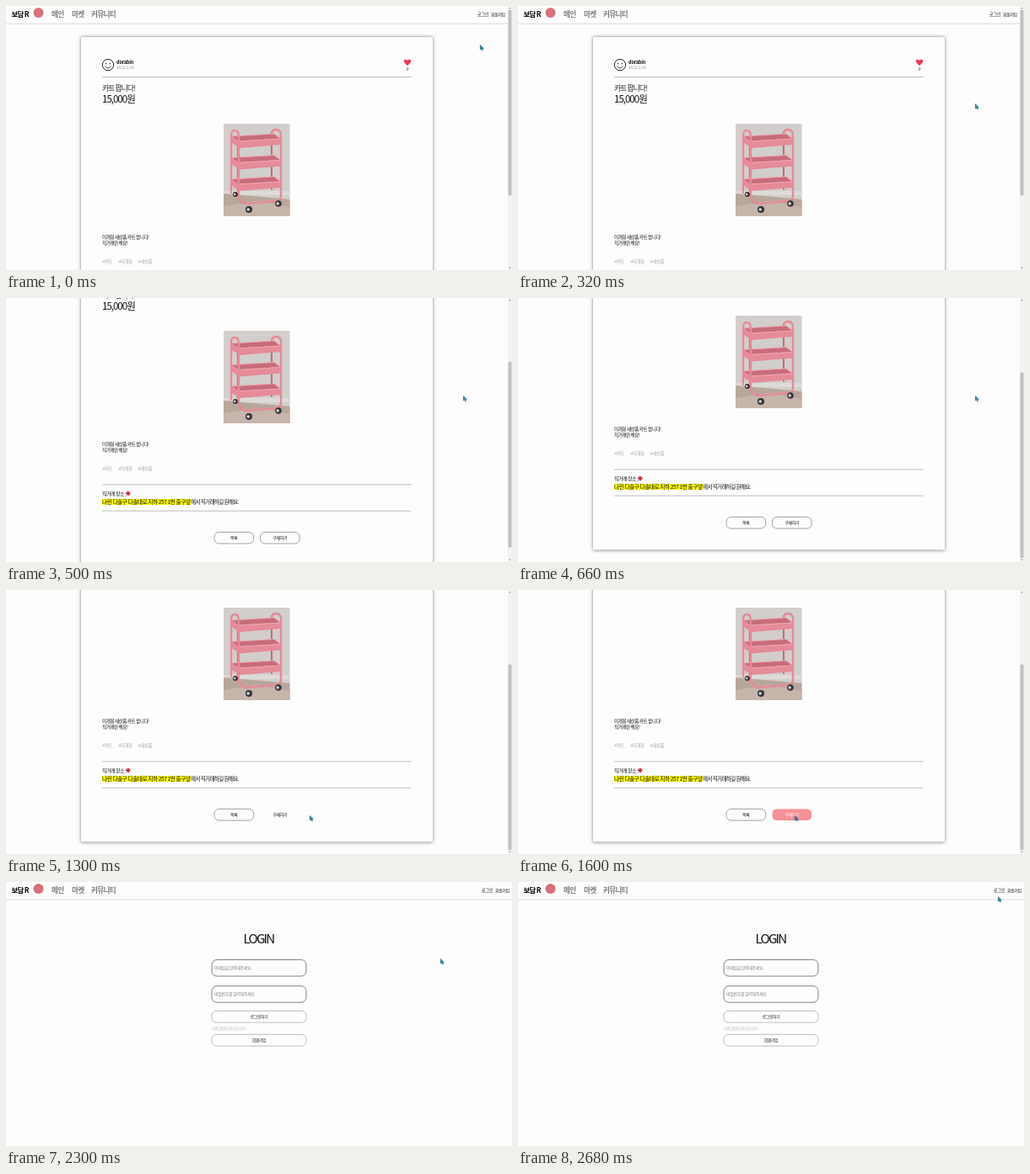
These frames come from a looping animation (600x314 px, 2700 ms). An HTML page with a canvas:

```html
<!DOCTYPE html>
<html lang="ko">
<head>
<meta charset="utf-8">
<style>
  html, body { margin: 0; width: 100%; height: 100%; overflow: hidden; background: #fefdfe; }
  canvas { display: block; }
</style>
</head>
<body>
<canvas id="stage" width="600" height="314"></canvas>
<script>
const ctx = document.getElementById('stage').getContext('2d');
const LOOP = 2700, MAX_SCROLL = 119;
const FONT = '"Noto Sans CJK KR", "Noto Sans CJK", "Noto Sans", sans-serif';
const HOVER_AT = 1300, ALERT_AT = 1620, LOGIN_AT = 2120;

// Pointer keys: time, x, y
const POINTER = [
  [0, 562, 46], [20, 562, 46], [280, 542, 116], [800, 542, 116],
  [1140, 408, 268], [1299, 408, 268], [1300, 360, 268], [1400, 328, 268],
  [1660, 328, 268], [1930, 307, 28], [1950, 307, 28], [2040, 352, 28],
  [2120, 352, 28], [2300, 515, 91], [2410, 515, 91], [2550, 581, 45],
  [2680, 569, 17], [2700, 569, 17]
];

const clamp = v => Math.max(0, Math.min(1, v));
const ease = v => v * v * (3 - 2 * v);
const progress = (t, from, to) => clamp((t - from) / (to - from));

// y is the vertical centre of the glyphs, spacing is in em
function text(str, x, y, size, { color = '#111', weight = 400, align = 'left', spacing = -.08 } = {}) {
  ctx.font = `${weight} ${size}px ${FONT}`;
  ctx.letterSpacing = spacing * size + 'px';
  ctx.textAlign = align;
  ctx.fillStyle = color;
  ctx.fillText(str, x, y + size * .37);
}

function rect(x, y, w, h, color) {
  ctx.fillStyle = color;
  ctx.fillRect(x, y, w, h);
}

function circle(x, y, r, color) {
  ctx.beginPath();
  ctx.arc(x, y, r, 0, 7);
  ctx.fillStyle = color;
  ctx.fill();
}

function path(d, { fill, stroke, width = 1 }) {
  const p = new Path2D(d);
  if (fill) { ctx.fillStyle = fill; ctx.fill(p); }
  if (stroke) { ctx.strokeStyle = stroke; ctx.lineWidth = width; ctx.stroke(p); }
}

function box(x, y, w, h, r, { fill, stroke }) {
  ctx.beginPath();
  ctx.roundRect(x, y, w, h, r);
  if (fill) { ctx.fillStyle = fill; ctx.fill(); }
  if (stroke) { ctx.strokeStyle = stroke; ctx.lineWidth = .9; ctx.stroke(); }
}

function shadowed(blur, color, draw) {
  ctx.save();
  ctx.shadowBlur = blur;
  ctx.shadowColor = color;
  draw();
  ctx.restore();
}

function drawNav(right) {
  rect(0, 20.5, right, 1, '#dcdcdc');
  text('보담 R', 6.5, 10, 8.4, { weight: 900, color: '#000' });
  circle(38.5, 8, 6, '#d8707c');
  const menu = { weight: 700, color: '#7c7c7c' };
  text('메인', 54, 10, 8.6, menu);
  text('마켓', 78, 10, 8.6, menu);
  text('커뮤니티', 101, 10, 8.6, menu);
  text('로그인', right - 36, 10, 5.2);
  text('회원가입', right - 20, 10, 5);
}

function drawPhoto() {
  const pink = '#e58b99', dark = '#c76c7b', light = '#f0a5b0';
  ctx.save();
  ctx.translate(258, 140);
  ctx.beginPath();
  ctx.rect(0, 0, 78.5, 110);
  ctx.clip();
  rect(0, 0, 79, 110, '#d2cecc');
  rect(0, 80, 79, 5, '#dedad8');
  path('M0 83L79 90V110H0Z', { fill: '#b9a69b' });
  path('M0 98L40 92L79 99V110H0Z', { fill: '#c6b5ab' });
  ctx.lineJoin = ctx.lineCap = 'round';
  path('M17 15V80M57 10V78', { stroke: dark, width: 2.2 });
  for (const y of [12, 37.5, 63]) {
    path(`M9 ${y + 3}L60 ${y}L68 ${y + 6}L18 ${y + 9}Z`, { fill: dark, stroke: light, width: 1 });
    path(`M9 ${y + 3}L18 ${y + 9}L68 ${y + 6}V${y + 13}L19 ${y + 17}L10 ${y + 11}Z`, { fill: pink });
    path(`M18 ${y + 9}L68 ${y + 6}`, { stroke: light, width: 1.2 });
  }
  path('M9 82V14Q9 8 13 8Q18 8 18 15V84Q18 95 28 95L63 92Q68 91 68 85V12Q67 7 62 7Q58 7 57 11',
    { stroke: pink, width: 2.4 });
  for (const [x, y, r] of [[14, 84, 3], [30, 102, 4], [65, 95, 3.8]]) {
    circle(x, y, r, '#34343a');
    circle(x - .8, y, r * .45, '#d8d8d8');
  }
  ctx.restore();
}

function drawProfile() {
  ctx.beginPath();
  ctx.arc(121, 70, 6.7, 0, 7);
  ctx.strokeStyle = '#222';
  ctx.lineWidth = 1;
  ctx.stroke();
  circle(118.6, 68.5, .7, '#222');
  circle(123.4, 68.5, .7, '#222');
  path('M117.2 71.5Q121 76 124.8 71.5', { stroke: '#222', width: .8 });
  text('dorabin', 131, 67, 5.5, { weight: 700, spacing: -.03 });
  text('2023-2-25', 131, 73.7, 4.8, { color: '#999', spacing: -.02 });
  path('M476 71C473 68.5 471.8 67.2 471.8 65.6C471.8 63 475 62.6 476 65C477 62.6 480.2 63 480.2 65.6C480.2 67.2 479 68.5 476 71Z',
    { fill: '#f23b50' });
  text('0', 476, 75.5, 5, { color: '#444', align: 'center' });
}

function drawMarket(t) {
  const scroll = Math.round(MAX_SCROLL * ease(progress(t, 320, 560)));
  ctx.save();
  ctx.translate(0, -scroll);
  drawNav(595);
  shadowed(4, '#777', () => rect(89, 37, 417, 381.5, '#fefdfe'));
  drawProfile();
  for (const y of [84, 322.5, 353.7]) rect(114, y, 366.5, 1, '#bdbdbd');

  text('카트 팝니다!', 114, 98, 8.9, { weight: 300, color: '#222', spacing: -.11 });
  text('15,000원', 114, 110.5, 11.6, { weight: 500, spacing: -.09 });
  drawPhoto();
  text('미개봉 새상품 카트 팝니다!', 114, 274.5, 5.6);
  text('직거래만 해요!', 114, 282, 5.6);
  text('#카트', 114, 304, 5.6, { color: '#aaa' });
  text('#미개봉', 133, 304, 5.6, { color: '#aaa' });
  text('#새상품', 156.5, 304, 5.6, { color: '#aaa' });

  text('직거래 장소', 114, 334, 6, { weight: 500 });
  path('M143.6 331.2L145.4 330.8L148 333.4L147 334.4L145.4 336.6L141.6 333.6Z', { fill: '#d8323f' });
  path('M143.4 335L141.4 337.4', { stroke: '#777', width: .7 });
  rect(114, 340, 105, 7, '#f8f800');
  text('나린 다솔구 다솔대로 지하 257 1번 출구앞', 114, 343.5, 6.6, { weight: 500, spacing: -.06 });
  text('에서 직거래하길 원해요.', 219, 343.5, 6.6, { weight: 500, spacing: -.1 });

  const hovered = t >= HOVER_AT, pink = progress(t, HOVER_AT, HOVER_AT + 300);
  box(247, 379.5, 46.7, 13.6, 5.5, { stroke: '#999' });
  text('목록', 270.3, 386.3, 5, { align: 'center' });
  box(301.5, 379.5, 46.7, 13.6, 5.5,
    hovered ? { fill: `rgba(247,143,151,${pink})` } : { stroke: '#999' });
  text('구매하기', 324.7, 386.3, 5, { align: 'center', color: pink > .5 ? '#fff' : '#111' });
  ctx.restore();

  rect(595, 0, 5, 314, '#f3f3f3');
  rect(595.5, 5 + scroll * .702, 4, 220.5, '#c1c1c1');
  path('M596.3 3.3L597.5 1.8L598.7 3.3Z', { fill: '#777' });
  path('M596.3 310.7L597.5 312.2L598.7 310.7Z', { fill: '#777' });
  if (t >= ALERT_AT) drawAlert();
}

function drawAlert() {
  shadowed(4, '#888', () => box(230, -3, 140, 42, 2, { fill: '#fff' }));
  text('samplebox:4100 내용:', 235, 6.5, 5, { color: '#222', spacing: 0 });
  text('로그인 후 이용 가능합니다.', 235, 15.5, 4.5, { color: '#333', spacing: -.03 });
  box(344.6, 23.6, 20.8, 10, 1.5, { fill: '#fff', stroke: '#3c6ea8' });
  box(345.6, 24.6, 18.8, 8, 1, { fill: '#1a73e8' });
  text('확인', 355, 28.5, 4.3, { color: '#fff', align: 'center' });
}

function drawLogin() {
  drawNav(600);
  text('LOGIN', 281.5, 67.8, 15.2, { weight: 300, spacing: -.12 });
  box(244, 92.5, 112, 19.5, 6, { stroke: '#777' });
  text('이메일을 입력해주세요.', 247, 102, 5.05, { color: '#808080' });
  box(244, 123.7, 112, 19.5, 6, { stroke: '#777' });
  text('비밀번호를 입력해주세요.', 247, 133.3, 5.05, { color: '#808080' });
  box(244, 153.3, 112, 13.8, 5.5, { stroke: '#b5b5b5' });
  text('로그인하기', 300, 160.2, 4.9, { align: 'center' });
  text('아직 회원이 아니신가요?', 244, 174, 4.5, { color: '#bbb' });
  box(244, 181.3, 112, 13.8, 5.5, { stroke: '#b5b5b5' });
  text('회원가입', 300, 188.2, 4.9, { align: 'center' });
}

function drawPointer(t) {
  const i = POINTER.findIndex(key => key[0] > t);
  const [t0, x0, y0] = POINTER[i - 1], [t1, x1, y1] = POINTER[i];
  const k = ease(progress(t, t0, t1));
  ctx.save();
  ctx.translate(x0 + (x1 - x0) * k, y0 + (y1 - y0) * k);
  path('M.4 .5V6L1.7 5L2.6 6.8L3.5 6.4L2.7 4.6H4.2Z', { fill: '#2b90b5', stroke: '#1d5870', width: .6 });
  ctx.restore();
}

function frame(now) {
  const t = now % LOOP;
  rect(0, 0, 600, 314, '#fefdfe');
  if (t < LOGIN_AT) drawMarket(t); else drawLogin();
  drawPointer(t);
  requestAnimationFrame(frame);
}
requestAnimationFrame(frame);
</script>
</body>
</html>
```
